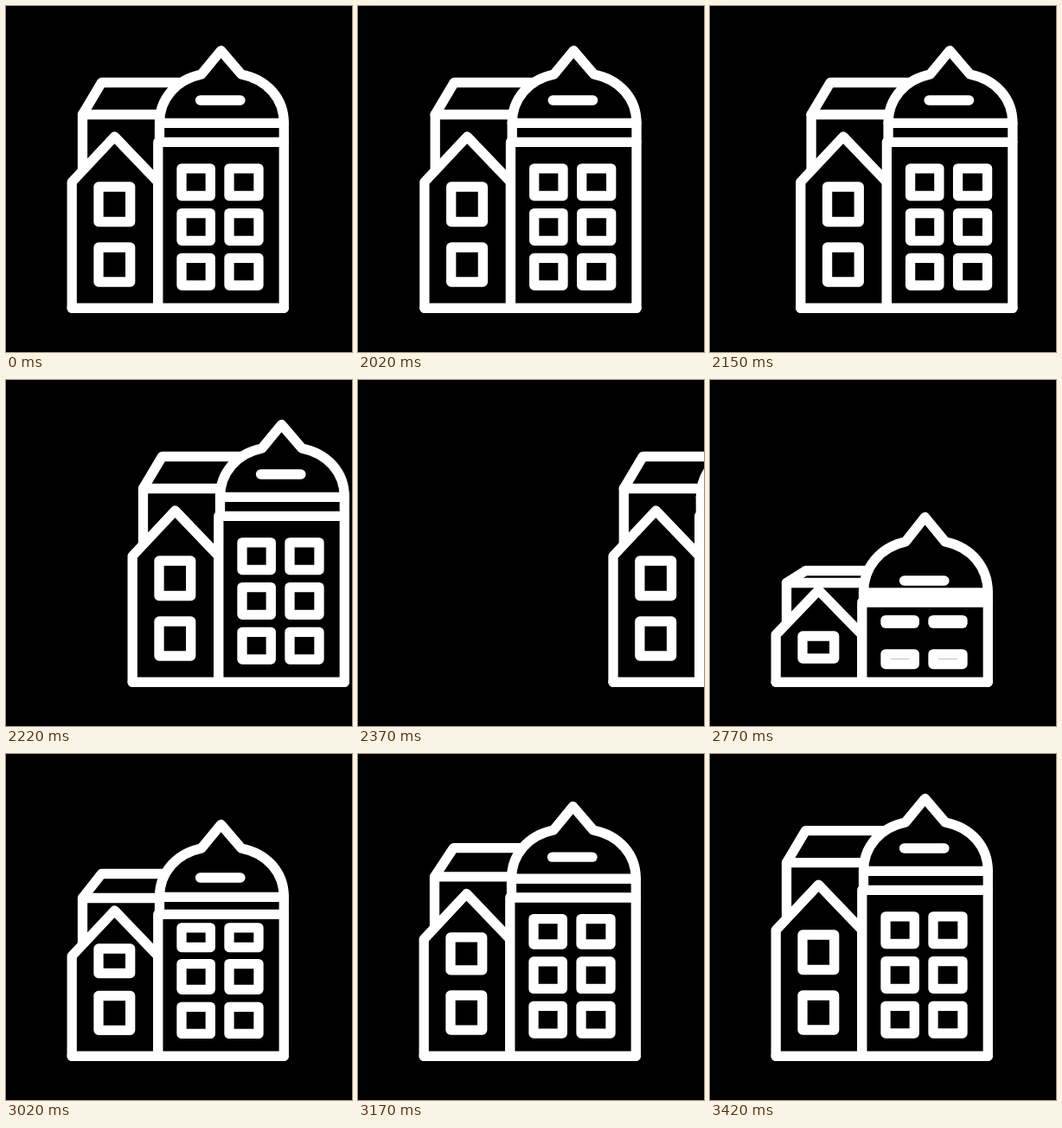
Write an HTML page with a canvas that moves like this. It is 400 px wide and 400 px high and loops after 3450 ms.

```html
<!DOCTYPE html>
<html lang="en">
<head>
<meta charset="utf-8">
<title>Building</title>
<style>
html, body { margin: 0; width: 100%; height: 100%; overflow: hidden; background: #000; }
canvas { display: block; width: 100vmin; height: 100vmin; }
</style>
</head>
<body>
<canvas></canvas>
<script>
const SIZE = 400, LOOP = 3450, STEP = 25;
const SLIDE_START = 1990, GROW_START = 2450;
const GROUND = 349.3;

const canvas = document.querySelector('canvas');
const ctx = canvas.getContext('2d');
const ratio = window.devicePixelRatio || 1;
canvas.width = canvas.height = SIZE * ratio;

// Remaining drop of a part, given its drop early (2770 ms) and late (3020 ms) in the growth.
function drop(time, early, late) {
  if (time < GROW_START) return 0;
  const power = Math.log(early / late) / Math.log(680 / 430);
  return early * Math.pow(Math.max(0, LOOP - time) / 680, power);
}

const level = (time, y, early, late) => Math.min(GROUND, y + drop(time, early, late));

function slideOffset(time) {
  if (time < SLIDE_START || time >= GROW_START) return 0;
  return 70 * Math.pow((time - SLIDE_START) / 230, 2.27);
}

function line(points, filled) {
  ctx.beginPath();
  points.forEach(([x, y]) => ctx.lineTo(x, y));
  if (filled) {
    ctx.closePath();
    ctx.fill();
  }
  ctx.stroke();
}

function drawBack(time, eaves) {
  const top = level(time, 88.5, 132, 50);
  const base = level(time, 125.5, 109, 41);
  line([[88.5, eaves], [88.5, base], [110.5, top], [210, top]]);
  line([[88.5, base], [185, base]]);
}

function drawHouse(peak, eaves) {
  line([[76.2, GROUND], [76.2, eaves], [125.5, peak], [175.8, eaves], [175.8, GROUND]], true);
}

function drawDome(top, base) {
  const scale = (base - top) / 84;
  const y = v => top + (v - 51.5) * scale;
  ctx.beginPath();
  ctx.moveTo(177.5, base);
  ctx.bezierCurveTo(177.5, y(107), 197, y(85), 226, y(79));
  ctx.lineTo(248.5, top);
  ctx.lineTo(272, y(79));
  ctx.bezierCurveTo(302, y(85), 321.3, y(107), 321.3, base);
  ctx.closePath();
  ctx.fill();
  ctx.stroke();
}

function drawTower(time) {
  const top = level(time, 51.5, 107, 30);
  const base = level(time, 135.3, 110.5, 30);
  const ledge = level(time, 157.3, 99.5, 28);
  const bar = level(time, 109, 123, 34);
  line([[175.8, GROUND], [175.8, ledge], [321.3, ledge], [321.3, GROUND]], true);
  line([[177.5, ledge], [177.5, base], [321.3, base], [321.3, ledge]], true);
  drawDome(top, base);
  if (bar < base) line([[224.5, bar], [271, bar]]);
}

// Edges: [y, early drop, late drop]
function drawWindow(time, left, right, upper, lower) {
  const top = level(time, ...upper);
  const bottom = level(time, ...lower);
  if (top <= bottom && bottom < GROUND) {
    ctx.strokeRect(left, top, right - left, Math.max(0.1, bottom - top));
  }
}

const towerRows = [
  [[187.8, 69, 13], [219.5, 37, 4]],
  [[239.6, 38, 3], [271.3, 10, 1]],
  [[291.3, 25.5, 1], [323, 5.5, 0.4]]
];
const houseRows = [
  [[209, 100, 16], [249.5, 50, 4]],
  [[279, 17, 0.5], [319, 3, 0.3]]
];

function draw(time) {
  ctx.setTransform(ratio, 0, 0, ratio, 0, 0);
  ctx.fillStyle = '#000';
  ctx.fillRect(0, 0, SIZE, SIZE);
  ctx.translate(slideOffset(time), 0);
  ctx.strokeStyle = '#fff';
  ctx.lineWidth = 11.3;
  ctx.lineCap = ctx.lineJoin = 'round';

  const peak = level(time, 151, 92, 30);
  const eaves = level(time, 203.5, 91, 30);
  drawBack(time, eaves);
  drawHouse(peak, eaves);
  drawTower(time);
  line([[76.2, GROUND], [321.3, GROUND]]);

  for (const [upper, lower] of towerRows) {
    drawWindow(time, 203, 236.3, upper, lower);
    drawWindow(time, 258, 292, upper, lower);
  }
  for (const [upper, lower] of houseRows) drawWindow(time, 107, 143.7, upper, lower);
}

const start = performance.now();
function frame() {
  const time = (performance.now() - start) % LOOP;
  draw(Math.floor((time + 5) / STEP) * STEP - 5);
  requestAnimationFrame(frame);
}
frame();
</script>
</body>
</html>
```
